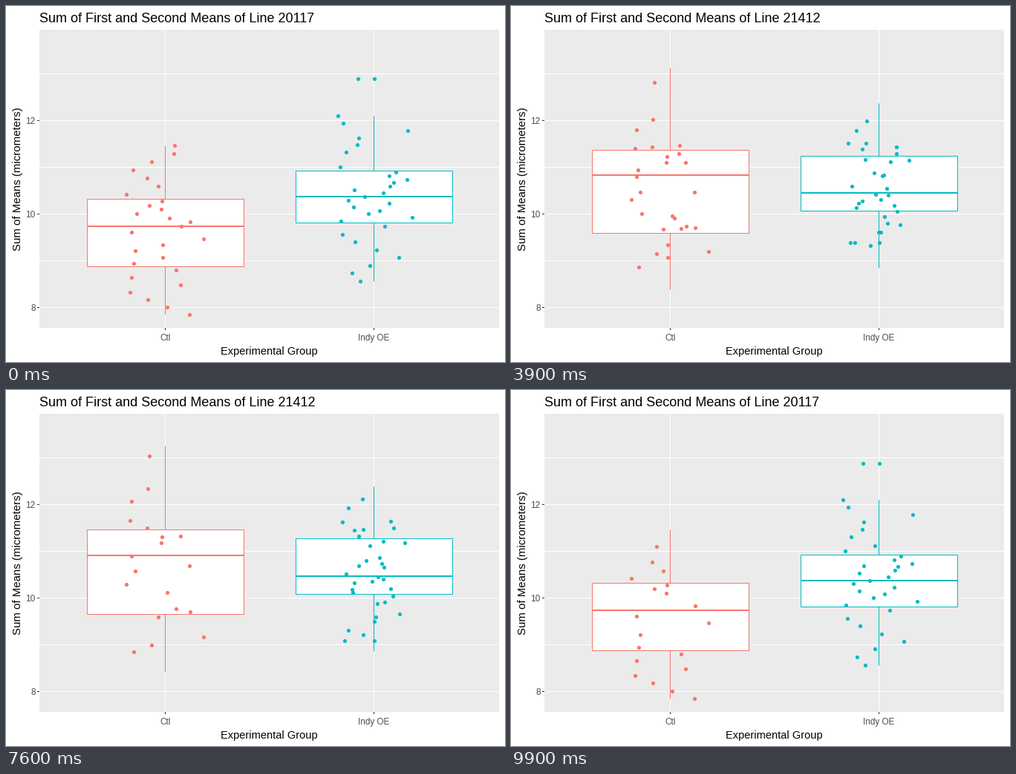
These frames come from a looping animation (672 px wide and 480 px high, 10 s). A matplotlib script:

```python
import numpy as np
import matplotlib.pyplot as plt
from matplotlib.animation import FuncAnimation
from matplotlib.patches import Rectangle

W, H, DPI = 672, 480, 72
FRAMES, STEP = 100, 100
LEAVE, ARRIVE, RETURN = 16, 50, 67
RED, TEAL = "#F8766D", "#02BBC3"
HALF_BOX, SPREAD = 105.5, 53

plt.rcParams["font.family"] = "Liberation Sans"
rng = np.random.default_rng(20)

# One jitter sequence serves both lines, control points first
jitter = rng.uniform(-SPREAD, SPREAD, 58)


def mix(a, b, s):
    return a + (b - a) * s


def pixel(v):
    """Centre of the pixel that holds v."""
    return np.floor(v + 0.5) + 0.5


def progress(n):
    """Share of the second line, with sine easing both ways."""
    if n < RETURN:
        p = np.clip((n - LEAVE) / (ARRIVE - LEAVE), 0, 1)
    else:
        p = 1 - (n - RETURN) / (FRAMES - RETURN)
    return (1 - np.cos(np.pi * p)) / 2


def sample(mid, first, count, levels, outlier):
    """Jittered points whose heights have the quartiles given by levels."""
    y = np.interp(np.linspace(0, 1, count), np.linspace(0, 1, 5), levels)
    y = rng.permutation(y)
    x = mid + jitter[first:first + count]
    points = np.column_stack([x, y])
    if outlier:
        points[0, 1] = outlier
        points = np.vstack([(mid, outlier), points])
    return points


fig = plt.figure(figsize=(W / DPI, H / DPI), dpi=DPI, facecolor="white")
ax = fig.add_axes([0, 0, 1, 1])
ax.set_xlim(0, W)
ax.set_ylim(H, 0)
ax.axis("off")


def line(x, y, color, width=1, z=1):
    return ax.plot(x, y, color=color, lw=width, zorder=z, snap=False,
                   solid_capstyle="butt")[0]


def label(x, y, text, size, color="black", ha="center", **kw):
    return ax.text(x, y, text, size=size, color=color, ha=ha,
                   va="baseline", **kw)


class Group:
    """A box plot with its points, moving between two lines.

    Levels are the heights of whisker top, Q3, median, Q1 and whisker end.
    """

    def __init__(self, mid, color, levels, firsts, counts, outliers):
        self.levels = np.array(levels)
        self.points = [sample(mid, *spec) for spec in
                       zip(firsts, counts, levels, outliers)]
        left, right = mid - HALF_BOX, mid + HALF_BOX
        self.stems = [line([mid, mid], [0, 0], color, z=2) for _ in range(2)]
        self.body = Rectangle((left + 0.5, 0), right - left, 1, fc="white",
                              ec=color, lw=1, zorder=3, snap=False)
        ax.add_patch(self.body)
        self.median = line([left, right + 1], [0, 0], color, 2, 4)
        self.dots = ax.scatter([], [], s=5.2 ** 2, c=color, linewidths=0,
                               zorder=5)

    def update(self, n, s):
        top, q3, med, q1, low = pixel(mix(*self.levels, s))
        self.stems[0].set_ydata([top, q3])
        self.stems[1].set_ydata([q1, low])
        self.body.set_y(q3)
        self.body.set_height(q1 - q3)
        self.median.set_ydata([med - 0.5] * 2)

        # Points without a partner wait in place until the line changes
        a, b = self.points
        k = min(len(a), len(b))
        waiting = a[k:] if n < ARRIVE else b[k:]
        self.dots.set_offsets(np.vstack([mix(a[:k], b[:k], s), waiting]))


# Panel, grid and axes
ax.add_patch(Rectangle((45, 32), 619, 402, fc="#EBEBEB", lw=0, zorder=0))
for value in range(8, 14):
    y = 406.5 - 63 * (value - 8)
    line([45, 664], [y, y], "white")
    if value % 2 == 0:
        line([42, 45], [y, y], "#333333")
        label(39.5, y + 4.5, str(value), 11.75, "#4D4D4D", "right")
for x, name in ((214.5, "Ctl"), (495.5, "Indy OE")):
    line([x, x], [32, 434], "white")
    line([x, x], [434, 437], "#333333")
    label(x, 451, name, 11.75, "#4D4D4D")

title = label(45, 22, "", 18, ha="left")
label(354.5, 470, "Experimental Group", 14.6)
label(20, 233.5, "Sum of Means (micrometers)", 15, rotation=90,
      rotation_mode="anchor")

groups = [
    Group(214.5, RED,
          [(188, 260, 297, 351, 416), (51, 173, 207, 292, 372)],
          firsts=(0, 0), counts=(27, 19), outliers=(None, None)),
    Group(495.5, TEAL,
          [(148, 222, 257, 292, 371), (126, 196, 250, 271, 348)],
          firsts=(27, 19), counts=(31, 33), outliers=(98, 388)),
]


def draw(n):
    s = progress(n)
    title.set_text("Sum of First and Second Means of Line "
                   + ("20117" if s < 0.5 - 1e-9 else "21412"))
    for group in groups:
        group.update(n, s)
    return [title]


anim = FuncAnimation(fig, draw, frames=FRAMES, interval=STEP, repeat=True,
                     repeat_delay=0, blit=False)
plt.show()
```
